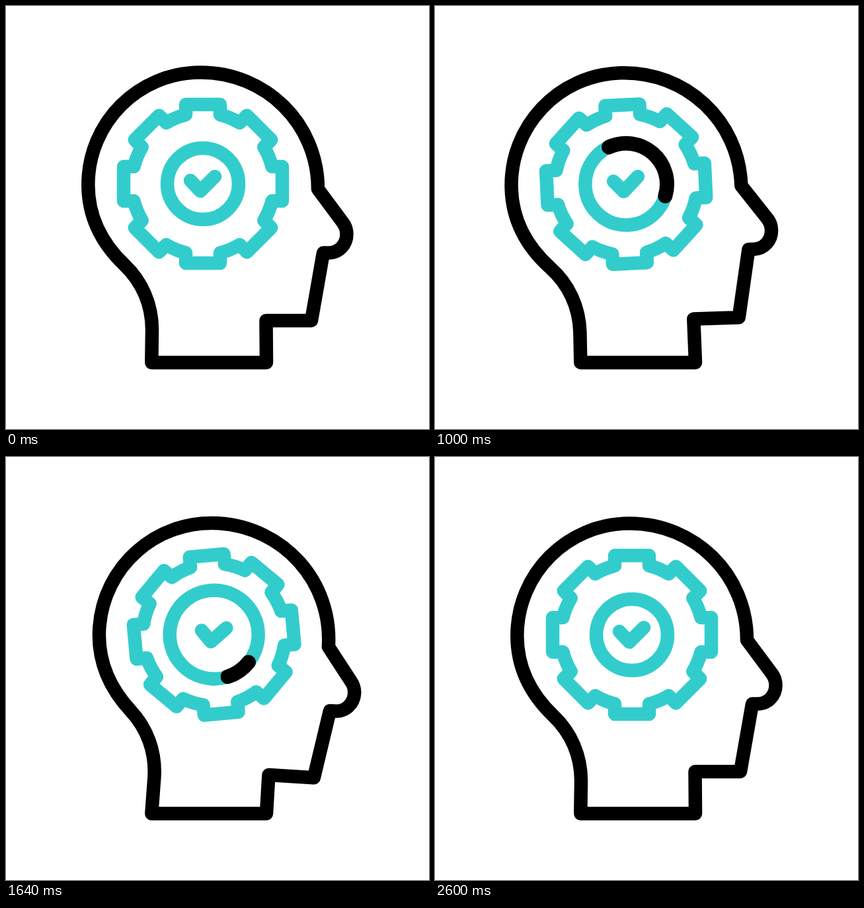
These frames come from a looping animation (640x640 px, 3 s). An HTML page:

```html
<!DOCTYPE html>
<html lang="en">
<head>
<meta charset="utf-8">
<title>Thinking head</title>
<style>
  html, body { margin: 0; width: 100%; height: 100%; overflow: hidden; background: #fff; }
  svg { display: block; width: 100%; height: 100%; }
  path, circle { fill: none; stroke-width: 20.5; stroke-linecap: round; stroke-linejoin: round; }
  .ink { stroke: #000; }
  .teal { stroke: #33cccc; }
  #arc { stroke-width: 22; }
</style>
</head>
<body>
<svg viewBox="0 0 640 640">
  <path id="head" class="ink"/>
  <g id="mind">
    <path id="gear" class="teal"/>
    <path class="teal" d="M-19,-5 L-4,11 L18,-11"/>
    <circle id="ring" class="teal"/>
  </g>
  <path id="arc" class="ink"/>
</svg>
<script>
const LOOP = 3000, STEP = 40;
const PIVOT = [312, 543], HUB = [298, 269];
const RAD = Math.PI / 180;

// Part of the outline that leans; the base of the neck stays put
const skull = 'L393.5,476 L462,476 L480,373.5 L488,373.5 ' +
  'C503.5,373.5 515.5,361 515.5,345.5 C515.5,339 513.5,332.5 509.5,327.5 L472,277 ' +
  'C472,178 393,100.5 294.5,100.5 C200.1,100.5 124.3,176.6 124.3,270.5 ' +
  'C124.3,318 145,359 179,391.5 C206,417 221,452 221,490 ';

const $ = id => document.getElementById(id);
const head = $('head'), mind = $('mind'), gear = $('gear'), ring = $('ring'), arc = $('arc');

// Progress 0..1 from a to b along cubic-bezier(x1, 0, x2, 1)
function ease(t, a, b, x1 = 1 / 3, x2 = 2 / 3) {
  const x = Math.min(1, Math.max(0, (t - a) / (b - a)));
  let lo = 0, hi = 1;
  for (let i = 0; i < 24; i++) {
    const s = (lo + hi) / 2, w = 1 - s;
    if (3 * x1 * s * w * w + 3 * x2 * s * s * w + s ** 3 < x) lo = s; else hi = s;
  }
  return lo * lo * (3 - 2 * lo);
}

function turn(x, y, deg) {
  const c = Math.cos(deg * RAD), s = Math.sin(deg * RAD);
  return [x * c - y * s, x * s + y * c];
}

function around(x, y, deg) {
  const [dx, dy] = turn(x - PIVOT[0], y - PIVOT[1], deg);
  return [PIVOT[0] + dx, PIVOT[1] + dy];
}

function gearPath(half, foot, tip) {
  const valley = `A${Math.hypot(half, foot)},${Math.hypot(half, foot)} 0 0 1 `;
  const tooth = [[-half, -foot], [-half, -tip], [half, -tip], [half, -foot]];
  let d = '';
  for (let a = 0; a < 360; a += 45) {
    tooth.forEach(([x, y], i) => {
      d += (i ? 'L' : a ? valley : 'M') + turn(x, y, a).map(v => v.toFixed(2)).join();
    });
  }
  return d + valley + `${-half},${-foot}Z`;
}

// Clockwise arc, angles measured from the top
function arcPath([cx, cy], r, from, to) {
  const point = a => [cx + r * Math.sin(a * RAD), cy - r * Math.cos(a * RAD)];
  return `M${point(from)}A${r},${r} 0 ${to - from > 180 ? 1 : 0} 1 ${point(to)}`;
}

function draw(t) {
  const lean = -5.1 * ease(t, 0, 640) + 8.9 * ease(t, 640, 1520) - 3.8 * ease(t, 1520, 2200);
  const r = 54 + 14.3 * ease(t, 0, 640) - 10 * ease(t, 640, 1240) +
    8.7 * ease(t, 1240, 1640) - 13 * ease(t, 1640, 2600);
  const hub = around(...HUB, lean);
  const upper = skull.replace(/([\d.]+),([\d.]+)/g, (_, x, y) => around(+x, +y, lean).join());

  head.setAttribute('d', `M220.3,539.5 L394,539.5 ${upper}Z`);
  mind.setAttribute('transform', `translate(${hub}) rotate(${lean})`);
  gear.setAttribute('transform', `rotate(${-360 * ease(t, 290, 2240, 0.3, 0.9)})`);
  ring.setAttribute('r', r);

  // The arc's origin circles steadily while its two ends chase each other
  const origin = 0.292 * (t - 1000) - 25;
  const tail = 360 * ease(t, 1120, 1760), tip = 360 * ease(t, 750, 1360);
  arc.setAttribute('d', tip - tail > 0.5 ? arcPath(hub, r, origin + tail, origin + tip) : '');
}

gear.setAttribute('d', gearPath(26, 104.5, 120));
const start = performance.now();
function tick() {
  const t = (performance.now() - start) % LOOP;
  draw(Math.floor(t / STEP) * STEP);
  requestAnimationFrame(tick);
}
tick();
</script>
</body>
</html>
```
